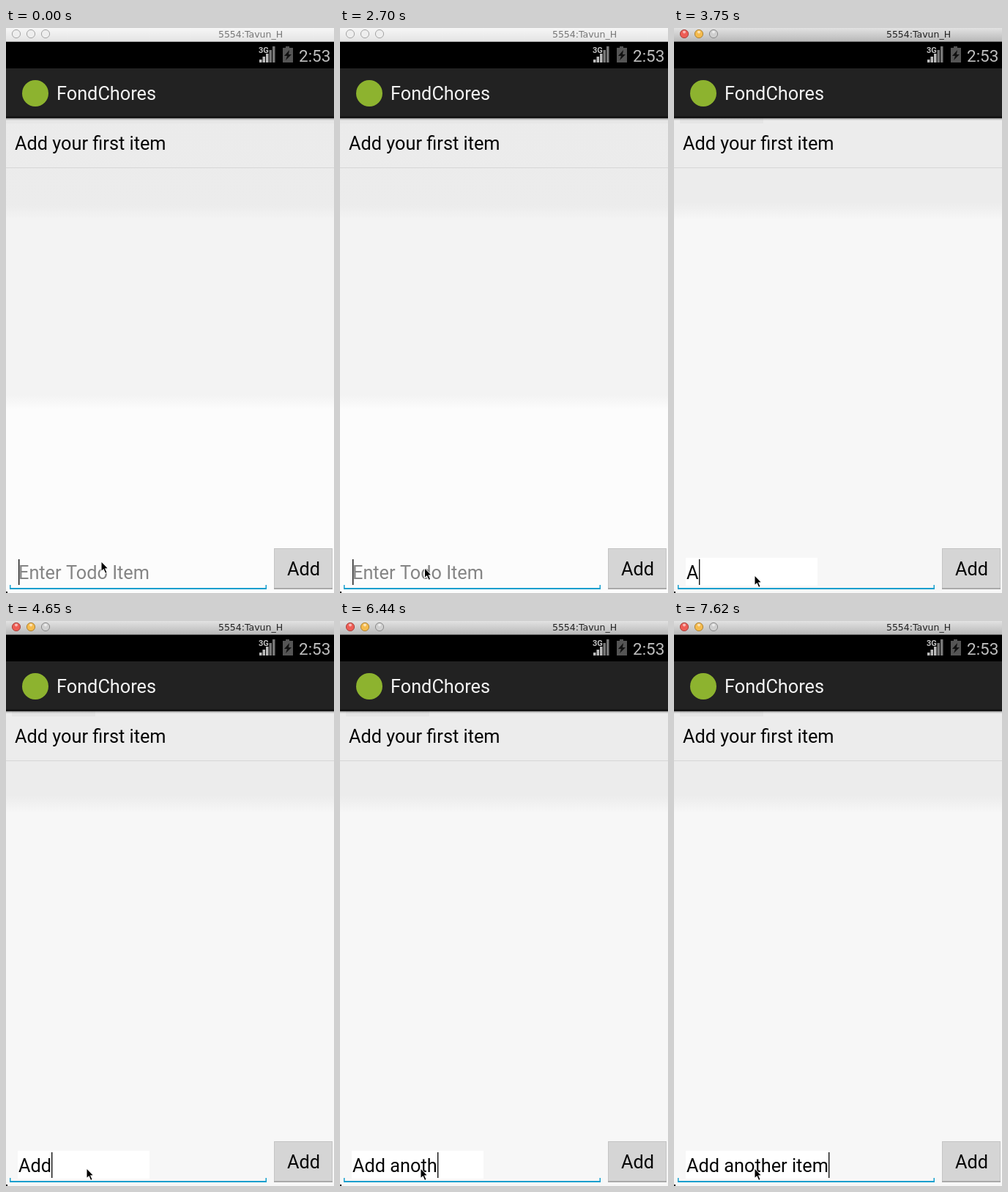
Recreate the animation shown at these times as an HTML page with a canvas. Size 448x770 px, loop 8 s.

```html
<!DOCTYPE html>
<html lang="en">
<head>
<meta charset="utf-8">
<title>Todo list demo</title>
<style>
  html, body { margin: 0; width: 448px; height: 770px; overflow: hidden; }
  canvas { display: block; }
</style>
</head>
<body>
<canvas id="stage" width="448" height="770"></canvas>
<script>
const ctx = document.getElementById('stage').getContext('2d');
const LOOP = 8000, ACTIVATE = 2850, FOCUSED = 3000, TYPE_START = 3750;
const BODY = '25.3px Roboto, sans-serif';

// Each entry holds from its time until the next one.
const pointer = [[0, 129.5, 726], [150, 132.5, 726], [2550, 127, 730],
                 [2700, 115, 735], [2850, 108.5, 742], [3000, 109.5, 745]];
const caretOn = [[0, true], [450, false], [1050, true], [1500, false], [2100, true], [3600, false], [3750, true]];
const typed = [[0, ''], [3750, 'A'], [4200, 'Ad'], [4650, 'Add'], [4950, 'Adda'], [5400, 'Add'],
  [5550, 'Add '], [5700, 'Add a'], [5850, 'Add an'], [6000, 'Add ano'], [6140, 'Add anot'],
  [6440, 'Add anoth'], [6590, 'Add anothe'], [6740, 'Add another'], [6880, 'Add another '],
  [7030, 'Add another i'], [7480, 'Add another ite'], [7620, 'Add another item']];

const at = (steps, t) => steps.findLast(step => step[0] <= t).slice(1);

function rect(x, y, w, h, fill) {
  ctx.fillStyle = fill;
  ctx.fillRect(x, y, w, h);
}

function text(str, x, y, fill, font = BODY, align = 'left') {
  ctx.font = font;
  ctx.textAlign = align;
  ctx.fillStyle = fill;
  ctx.fillText(str, x, y);
}

function shape(points, fill) {
  ctx.beginPath();
  for (let i = 0; i < points.length; i += 2) ctx.lineTo(points[i], points[i + 1]);
  ctx.closePath();
  ctx.fillStyle = fill;
  ctx.fill();
}

function disc(x, y, r, fill, stroke) {
  ctx.beginPath();
  ctx.arc(x, y, r, 0, 7);
  ctx.fillStyle = fill;
  ctx.fill();
  if (stroke) {
    ctx.lineWidth = 1;
    ctx.strokeStyle = stroke;
    ctx.stroke();
  }
}

// Vertical gradient from [y, colour] stops.
function fade(...stops) {
  const top = stops[0][0], bottom = stops.at(-1)[0];
  const g = ctx.createLinearGradient(0, top, 0, bottom);
  for (const [y, colour] of stops) g.addColorStop((y - top) / (bottom - top), colour);
  return g;
}

function titleBar(t) {
  const active = t >= ACTIVATE;
  rect(0, 0, 448, 19, active ? fade([0, '#e2e2e2'], [18, '#b9b9b9']) : fade([0, '#f6f6f6'], [18, '#e4e4e4']));
  rect(0, 18, 448, 1, active ? '#777' : '#aaa');
  const lights = t >= FOCUSED
    ? [['#ee5d55', '#a8433d'], ['#f5bb4d', '#ad8236'], ['#d0d0d0', '#8a8a8a']]
    : Array(3).fill(active ? ['#d0d0d0', '#8a8a8a'] : ['#eeeeee', '#a5a5a5']);
  lights.forEach(([fill, edge], i) => {
    disc(14 + i * 20, 8, 5.6, fill, edge);
    if (active) disc(14 + i * 20, 5.5, 2, '#ffffff90');
  });
  text('5554:Tavun_H', 334, 13, active ? '#222' : '#777', '12.5px "DejaVu Sans", sans-serif', 'center');
}

function statusBar() {
  rect(0, 19, 448, 36, '#000');
  text('3G', 345, 34, '#c4c4c4', 'bold 11px Roboto, sans-serif');
  for (let i = 0; i < 5; i++) {
    const h = [4, 8, 12, 17, 22][i];
    rect(346 + i * 4.5, 47 - h, 3.5, h, i < 3 ? '#bcbcbc' : '#777');
  }
  rect(382, 25, 5, 3, '#555');
  rect(378, 27, 14, 20, '#555');
  shape([387, 30, 380, 38, 384, 38, 382, 44, 390, 36, 386, 36], '#111');
  text('2:53', 400, 46, '#bebebe', '22.5px Roboto, sans-serif');
}

function actionBar() {
  rect(0, 55, 448, 67, '#222');
  rect(0, 120, 448, 3, '#161616');
  disc(40, 89, 18, '#8db32f');
  text('FondChores', 69, 98, '#f3f3f3');
}

function list(t) {
  const fill = t < ACTIVATE
    ? fade([122, '#ebebeb'], [242, '#ececec'], [260, '#f3f3f3'], [500, '#f3f3f3'], [520, '#fcfcfc'], [770, '#fcfcfc'])
    : fade([122, '#ececec'], [238, '#ececec'], [262, '#f7f7f7'], [770, '#f7f7f7']);
  rect(0, 122, 448, 648, fill);
  if (t < ACTIVATE) rect(0, 123, 448, 7, '#e7e7e7');
  if (t >= FOCUSED) rect(8, 123, 114, 7, '#e5e5e5');
  rect(0, 122, 448, 4, fade([122, '#00000070'], [126, '#00000000']));
  text('Add your first item', 12, 166, '#050505');
  rect(0, 190, 448, 1, '#d6d6d6');
}

function entry(t) {
  const [str] = at(typed, t);
  ctx.font = BODY;
  const caretX = 17 + ctx.measureText(str).width;
  if (t >= TYPE_START) {
    rect(16, 722, Math.max(196, caretX + 2) - 16, 38, '#fff');
    text(str, 17, 751, '#050505');
  } else {
    text('Enter Todo Item', 17, 751, '#858585');
  }
  if (at(caretOn, t)[0]) rect(Math.round(caretX), 724, 1.4, 35, '#111');

  rect(5, 763, 351, 2, '#169fce');
  rect(5, 759, 1.5, 6, '#169fce');
  rect(354.5, 759, 1.5, 6, '#169fce');

  rect(366, 709, 80, 56, '#c4c4c4');
  rect(367, 710, 78, 53, '#d5d5d5');
  rect(366, 763, 80, 2, '#a9a9a9');
  text('Add', 384, 746, '#050505');
  rect(0, 768, 2, 2, '#111');
}

function arrow(t) {
  const [x, y] = at(pointer, t);
  ctx.save();
  ctx.translate(x, y);
  shape([0, 0, 0, 15.5, 3.5, 12.5, 6, 18, 9, 16.6, 6.6, 11.5, 11, 11.2], '#fff');
  shape([1, 2, 1, 13.5, 3.9, 10.9, 6.4, 16.7, 8, 15.9, 5.4, 10.4, 9, 10.2], '#000');
  ctx.restore();
}

function draw(now) {
  const t = now % LOOP;
  list(t);
  titleBar(t);
  statusBar();
  actionBar();
  entry(t);
  arrow(t);
}

const start = performance.now();
function tick() {
  draw(performance.now() - start);
  requestAnimationFrame(tick);
}
tick();
</script>
</body>
</html>
```
